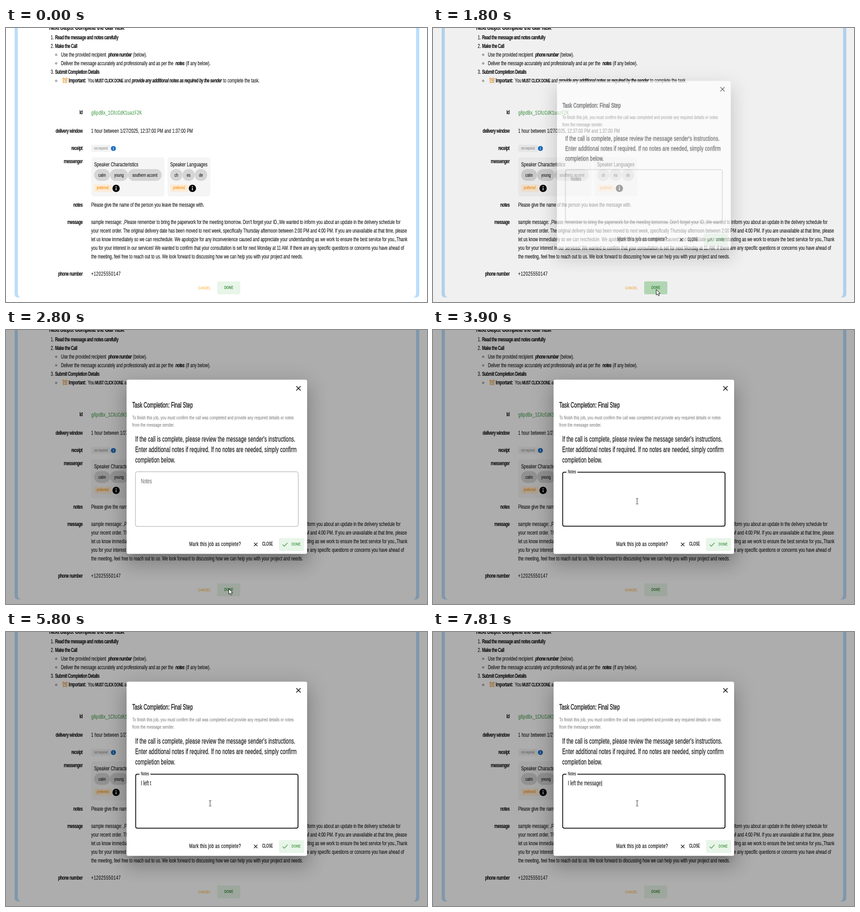
Animation, 927 px wide and 604 px high, one loop 8 s. Source, as an HTML page:

```html
<!DOCTYPE html>
<html lang="en">
<head>
<meta charset="utf-8">
<title>Task completion</title>
<style>
html, body { margin: 0; width: 100%; height: 100%; overflow: hidden; background: #fff; }
svg { display: block; width: 927px; height: 604px; }
text {
  font: 13px "Liberation Sans", Arial, sans-serif;
  color: #1c1c1c; fill: currentColor; stroke: currentColor; stroke-width: .2;
  white-space: pre;
}
.b { font-weight: 700; letter-spacing: -.06em; }
.i { font-style: italic; }
.term { letter-spacing: -.085em; }
.tight { letter-spacing: -.1px; }
.num { letter-spacing: .14px; }
.caps { font-size: 11px; }
.end { text-anchor: end; }
.mid { text-anchor: middle; }
.head { font-size: 16.8px; }
.id { font: 13.2px "Liberation Mono", monospace; color: #4c9f50; }
.tag { font-size: 8.4px; color: #9a9a9a; }
.pref { font-size: 8.5px; letter-spacing: .5px; color: #fb9d27; stroke-width: .4; }
.sub { font-size: 13.7px; }
.chip { font-size: 11.6px; }
.phone { letter-spacing: .9px; }
.btn { font-size: 9.5px; letter-spacing: .5px; stroke-width: .5; }
.orange { color: #fbb040; stroke-width: .2; }
.green { color: #3f8f43; }
.leaf { color: #59a65c; }
.title { font-size: 16px; stroke-width: .45; }
.hint { font-size: 11.6px; letter-spacing: .2px; color: #858585; }
.lead { font-size: 16px; letter-spacing: .28px; stroke-width: .3; }
.ask { letter-spacing: .6px; stroke-width: .35; }
.close { font-size: 10.5px; stroke-width: .4; }
.field { font-size: 13.8px; }
.grey { color: #777; }
.float { font-size: 10.3px; }

.ripple, #scrim, #dialog, #arrow, #beam, .rest, .focus, .hover {
  animation: 8s step-end infinite;
}
.ripple { animation-name: ripple; opacity: 0; }
#scrim { animation-name: scrim; }
#dialog { animation-name: dialog; transform-origin: 464.25px 301.5px; }
#arrow { animation-name: arrow; }
#beam { animation-name: beam; }
.rest { animation-name: rest; }
.focus { animation-name: focus; }
.hover { animation-name: hover; }

@keyframes ripple {
  0% { opacity: 0 } 20% { opacity: .12 } 21.25% { opacity: .24 } 22.5% { opacity: .28 }
  23.75% { opacity: .18 } 25% { opacity: .09 } 26.25% { opacity: .03 } 27.5%, 100% { opacity: 0 }
}
@keyframes scrim {
  0% { opacity: 0 } 22.5% { opacity: .058 } 23.75% { opacity: .262 } 25% { opacity: .318 }
  26.25%, 100% { opacity: .32 }
}
@keyframes dialog {
  0% { opacity: 0; transform: scale(.9) }
  22.5% { opacity: .63; transform: scale(.9635) }
  23.75% { opacity: .96; transform: scale(.996) }
  25%, 100% { opacity: 1; transform: scale(1) }
}
@keyframes arrow {
  0% { opacity: 0; transform: translate(509px, 604px) }
  6.25% { opacity: 1; transform: translate(507px, 597px) }
  7.5% { opacity: 1; transform: translate(495px, 581px) }
  8.75% { opacity: 1; transform: translate(481px, 568px) }
  10% { opacity: 1; transform: translate(487px, 573px) }
  11.25% { opacity: 1; transform: translate(491px, 576px) }
  35% { opacity: 1; transform: translate(490px, 570px) }
  36.25% { opacity: 1; transform: translate(483px, 540px) }
  37.5% { opacity: 1; transform: translate(469px, 475px) }
  38.75%, 100% { opacity: 0; transform: translate(455px, 405px) }
}
@keyframes beam {
  0% { opacity: 0; transform: translate(455px, 405px) }
  38.75% { opacity: 1; transform: translate(455px, 405px) }
  40%, 100% { opacity: 1; transform: translate(449.5px, 377.5px) }
}
@keyframes rest { 0% { opacity: 1 } 43.75%, 100% { opacity: 0 } }
@keyframes focus { 0% { opacity: 0 } 43.75%, 100% { opacity: 1 } }
@keyframes hover { 0% { stroke: #a3a3a3 } 38.75%, 100% { stroke: #333 } }
</style>
</head>
<body>
<svg id="stage" xmlns="http://www.w3.org/2000/svg"></svg>
<script>
const LOOP = 8000, CONDENSE = .67;
const stage = document.getElementById('stage');

const text = (x, y, str, cls = '') =>
  `<text class="${cls}" transform="translate(${x} ${y}) scale(${CONDENSE} 1)">${str}</text>`;
const box = (x, y, w, h, r, fill, cls = '') =>
  `<rect class="${cls}" x="${x}" y="${y}" width="${w}" height="${h}" rx="${r}" fill="${fill}"/>`;
const line = (d, color, width) =>
  `<path d="${d}" fill="none" stroke="${color}" stroke-width="${width}"/>`;
const lines = (x, y, step, cls, rows) => rows.map((s, i) => text(x, y + i * step, s, cls)).join('');
const label = (y, str) => text(168.5, y, str, 'b end');
const bullet = y => `<circle cx="110.5" cy="${y}" r="1.8" fill="none" stroke="#333" stroke-width=".9"/>`;
const chip = (x, w, str) => box(x, 311, w, 26, 13, '#d5d5d5') + text(x + w / 2, 328, str, 'chip mid');
const info = (x, y, r, color) =>
  `<circle cx="${x}" cy="${y}" r="${r}" fill="${color}"/>` +
  `<circle cx="${x}" cy="${y - r * .45}" r="${r * .15}" fill="#fff"/>` +
  line(`M${x} ${y - r * .12}V${y + r * .52}`, '#fff', r * .24);
const preferred = x =>
  box(x, 345, 39, 16, 3, '#fdebd6') + text(x + 6, 355.3, 'preferred', 'pref') + info(x + 48.4, 353.5, 8, '#000');
const cross = (x, y, r, width) =>
  line(`M${x - r} ${y - r}l${2 * r} ${2 * r}m0 ${-2 * r}l${-2 * r} ${2 * r}`, '#222', width);
const shadow = (dy, blur, spread, alpha) =>
  `<rect x="${265.5 - spread}" y="${109.5 + dy - spread}" width="${397.5 + 2 * spread}"
    height="${384 + 2 * spread}" rx="4" opacity="${alpha}" style="filter: blur(${blur / 2}px)"/>`;

const side = 'M0 0H7V584Q7 594 16 594H8Q0 594 0 586Z';
const frame = `<g fill="#bbdefb"><path d="${side}" transform="translate(19 0)"/>
  <path d="${side}" transform="translate(910 0) scale(-1 1)"/></g>`;

const alarm = `<g fill="none" stroke="#f2a03d" stroke-width="1.6">
  <circle cx="130" cy="116" r="4.2" fill="#fdf3e2"/>
  <path d="M124.8 112.8q.2-2.6 2.8-2.8M135.2 112.8q-.2-2.6-2.8-2.8M126.6 120l-1.2 1.6M133.4 120l1.2 1.6"/>
  <path d="M130 113.4V116.2H132" stroke="#7a5a3a" stroke-width=".9"/></g>`;

const steps =
  text(95, 4, 'Next Steps: Complete the Call Task', 'b head') +
  text(98.5, 24.5, '1.') + text(108, 24.5, 'Read the message and notes carefully', 'b') +
  text(98.5, 43.5, '2.') + text(108, 43.5, 'Make the Call', 'b') +
  bullet(59) + text(121, 62.7, 'Use the provided recipient', 'tight') +
  text(225, 62.7, 'phone number', 'b i term') + text(279.5, 62.7, '(below).') +
  bullet(78) + text(121, 81.8, 'Deliver the message accurately and professionally and as per the', 'tight') +
  text(373, 81.8, 'notes', 'b i term') + text(396, 81.8, '(if any below).') +
  text(98.5, 101, '3.') + text(108, 101, 'Submit Completion Details', 'b') +
  bullet(116.5) + alarm + text(138, 120, 'Important:', 'b') + text(180, 120, 'You', 'tight') +
  text(196, 120, 'MUST CLICK DONE', 'b caps') + text(260.5, 120, 'and', 'tight') +
  text(277, 120, 'provide any additional notes as required by the sender', 'b i') +
  text(478, 120, 'to complete the task.');

const details =
  label(190, 'Id') + text(187.5, 190.5, 'g8pdBx_1CXcCdK1uazF2K', 'id') +
  label(230.5, 'delivery window') +
  text(187.5, 230.5, '1 hour between 1/27/2025, 12:37:00 PM and 1:37:00 PM', 'num') +
  label(269, 'receipt') + box(187.5, 257.5, 43.5, 15.5, 3, '#f3f3f3') +
  text(194, 267.5, 'not required', 'tag') + info(236.5, 265.5, 5.5, '#1b6fc2') +
  label(297.5, 'messenger') +
  box(187.5, 285, 161.5, 86, 6, '#f5f5f5') + text(194, 304.5, 'Speaker Characteristics', 'sub') +
  chip(194, 35, 'calm') + chip(229, 39.5, 'young') + chip(268.5, 74.5, 'southern accent') + preferred(194) +
  box(355.5, 285, 94.5, 86, 6, '#f5f5f5') + text(361.5, 304.5, 'Speaker Languages', 'sub') +
  chip(361.5, 27, 'ch') + chip(388.5, 27, 'es') + chip(415.5, 27.5, 'de') + preferred(362) +
  label(393.5, 'notes') + text(187.5, 393.5, 'Please give the name of the person you leave the message with.') +
  label(431.8, 'message') +
  lines(187.5, 431.8, 19.1, '', [
    "sample message: ,Please remember to bring the paperwork for the meeting tomorrow. Don't forget your ID.,We wanted to inform you about an update in the delivery schedule for",
    'your recent order. The original delivery date has been moved to next week, specifically Thursday afternoon between 2:00 PM and 4:00 PM. If you are unavailable at that time, please',
    'let us know immediately so we can reschedule. We apologize for any inconvenience caused and appreciate your understanding as we work to ensure the best service for you.,Thank',
    'you for your interest in our services! We wanted to confirm that your consultation is set for next Monday at 11 AM. If there are any specific questions or concerns you have ahead of',
    'the meeting, feel free to reach out to us. We look forward to discussing how we can help you with your project and needs.'
  ]) +
  label(546.3, 'phone number') + text(187.5, 546.3, '+12025550147', 'phone') +
  text(423, 575.5, 'CANCEL', 'btn orange') +
  box(465, 558.5, 51, 28.5, 3, '#e8f5e9') + box(465, 558.5, 51, 28.5, 3, '#4caf50', 'ripple') +
  text(490.5, 575.3, 'DONE', 'btn green mid');

const dialog = `<g id="dialog">` +
  shadow(11, 15, -7, .2) + shadow(24, 38, 3, .14) + shadow(9, 46, 8, .12) +
  box(265.5, 109.5, 397.5, 384, 4, '#fff') + cross(644, 128.6, 4.8, 1.7) +
  text(278, 171, 'Task Completion: Final Step', 'title') +
  lines(278, 196.8, 16, 'hint', [
    'To finish this job, you must confirm the call was completed and provide any required details or notes',
    'from the message sender.'
  ]) +
  lines(284.5, 246, 23, 'lead', [
    "If the call is complete, please review the message sender's instructions.",
    'Enter additional notes if required. If no notes are needed, simply confirm',
    'completion below.'
  ]) +
  `<g class="rest"><rect class="hover" x="285" y="312.5" width="358.5" height="120.5" rx="4" fill="none"/>` +
  text(297, 338, 'Notes', 'field grey') + `</g><g class="focus">` +
  line('M294 313.5H289.5Q285.5 313.5 285.5 317.5V428.5Q285.5 432.5 289.5 432.5H639Q643 432.5 643 428.5V317.5Q643 313.5 639 313.5H318',
    '#1c1c1c', 2) +
  line('M636.5 431L641.5 426M639.5 431L641.5 429', '#888', .8) +
  text(297, 315.5, 'Notes', 'float') + `</g>` +
  text(297, 338, '', 'field typed') + box(0, 328, 1, 12, 0, '#000', 'caret') +
  text(403.5, 475.5, 'Mark this job as complete?', 'ask') +
  cross(549.8, 472.8, 3.8, 1.4) + text(564, 475.3, 'CLOSE', 'close') +
  box(601, 458.5, 55.5, 28.5, 3, '#e8f5e9') + line('M609 473L612.7 476.6L620 469', '#59a65c', 1.5) +
  text(629, 475.3, 'DONE', 'btn leaf') + `</g>`;

const cursors = `<path id="arrow" d="M.5 .5V12.6L3.3 10L5.3 14.6L7.5 13.6L5.5 9.2H9.2Z" fill="#fff" stroke="#111"/>
  <path id="beam" d="M-2.5 -6H-.8L0 -5.4L.8 -6H2.5M0 -5.4V5.4M-2.5 6H-.8L0 5.4L.8 6H2.5" fill="none" stroke="#222"/>`;

stage.innerHTML = frame + steps + details + `<rect id="scrim" width="927" height="604"/>` + dialog + cursors;

const note = 'I left the message', focusTime = 3400, blink = 500;
const keyTimes = [4500, 4600, 4700, 4800, 4900, 5100, 5200, 5300, 5900,
  6000, 6100, 6300, 7010, 7310, 7510, 7610, 7710, 7810];
const typed = stage.querySelector('.typed'), caret = stage.querySelector('.caret');
let start;

function draw(now) {
  start ??= now;
  const t = (now - start) % LOOP;
  const count = keyTimes.filter(k => k <= t).length;
  const str = note.slice(0, count);
  if (typed.textContent !== str) typed.textContent = str;
  const idle = t - (count ? keyTimes[count - 1] : focusTime);
  const shown = idle >= 0 && Math.floor(idle / blink) % 2 === 0;
  caret.setAttribute('opacity', shown ? 1 : 0);
  const width = count ? typed.getComputedTextLength() * CONDENSE + 1 : 0;
  caret.setAttribute('x', Math.round(297 + width));
  requestAnimationFrame(draw);
}
requestAnimationFrame(draw);
</script>
</body>
</html>
```
